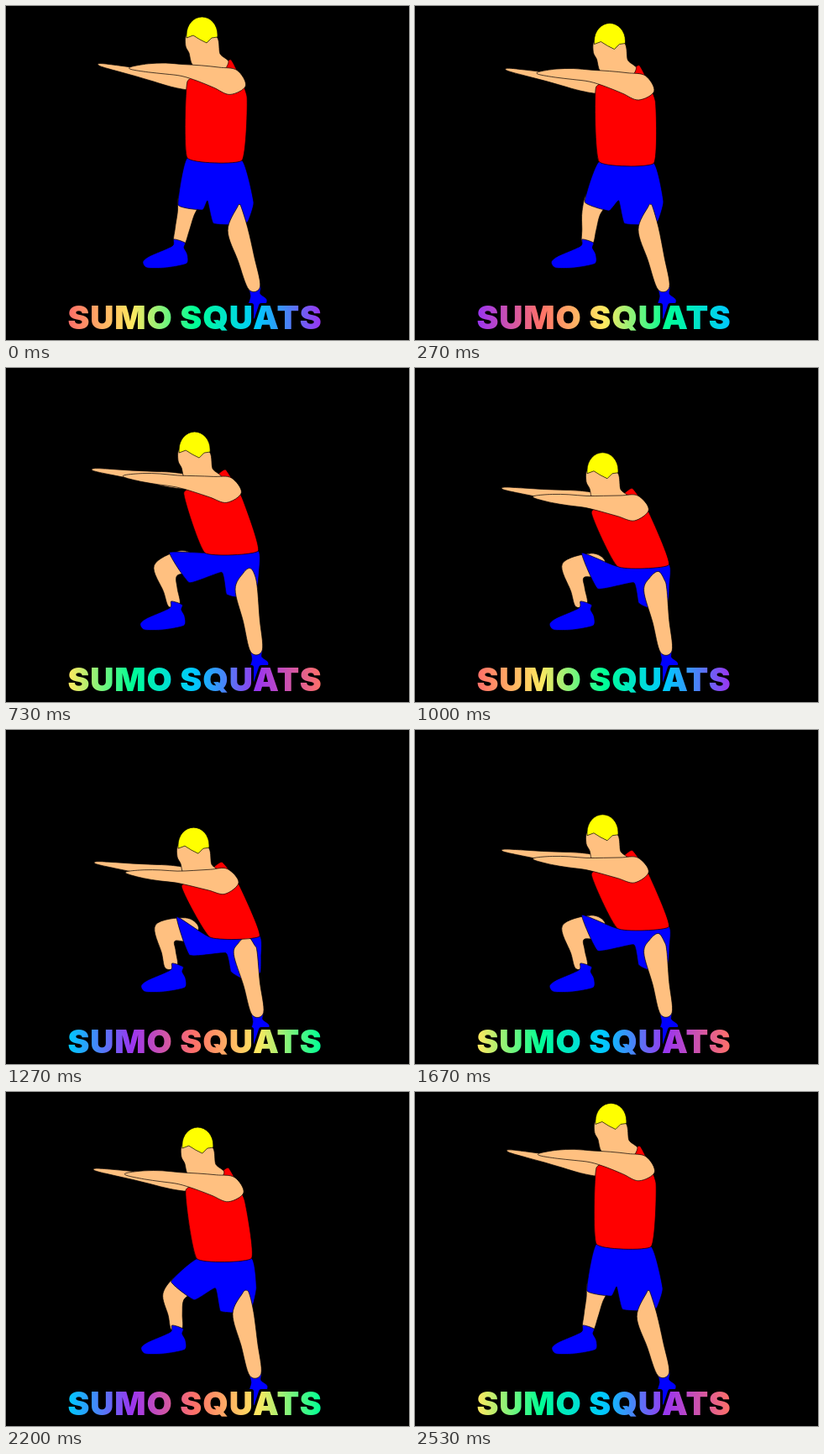
These frames come from a looping animation (480 px wide and 398 px high, 2590 ms). An HTML page with a canvas:

```html
<!DOCTYPE html>
<html lang="en">
<head>
<meta charset="utf-8">
<title>Sumo squats</title>
<style>
  html, body { margin: 0; width: 100%; height: 100%; overflow: hidden; background: #000; }
  canvas { display: block; }
</style>
</head>
<body>
<canvas id="stage" width="480" height="398"></canvas>
<script>
const ctx = document.getElementById('stage').getContext('2d');
const LOOP = 2590, STEP = 200 / 3, COLOUR_STEPS = 15;
const SKIN = '#ffc080', RED = '#ff0000', BLUE = '#0000ff', YELLOW = '#ffff00';
const RAINBOW = ['#ff7068', '#ffe860', '#00ff95', '#00c8ff', '#9b35f0'];

let depth = 0; // 0 standing, 1 deepest squat

const mix = (a, b, t) => a.map((v, i) => v + (b[i] - v) * t);

// A joint moves from its standing to its deep place, bending off the line midway.
const joint = (stand, deep, bend = [0, 0, 0]) =>
  mix(stand, deep, depth).map((v, i) => v + 4 * depth * (1 - depth) * (bend[i] || 0));

// Smooth closed outline; a larger tension keeps corners sharper.
function shape(points, fill, tension = 8) {
  const n = points.length, at = i => points[(i + n) % n];
  ctx.beginPath();
  ctx.moveTo(...at(0).slice(0, 2));
  for (let i = 0; i < n; i++) {
    const [a, b, c, d] = [at(i - 1), at(i), at(i + 1), at(i + 2)];
    ctx.bezierCurveTo(b[0] + (c[0] - a[0]) / tension, b[1] + (c[1] - a[1]) / tension,
      c[0] - (d[0] - b[0]) / tension, c[1] - (d[1] - b[1]) / tension, c[0], c[1]);
  }
  ctx.fillStyle = fill;
  ctx.fill();
  ctx.stroke();
}

// Outline around a spine of [x, y, radius], rounded at its last point.
function limb(spine) {
  const left = [], right = [], last = spine.length - 1;
  spine.forEach(([x, y, r], i) => {
    const a = spine[Math.max(0, i - 1)], b = spine[Math.min(last, i + 1)];
    const angle = Math.atan2(b[1] - a[1], b[0] - a[0]);
    const dx = r * Math.cos(angle), dy = r * Math.sin(angle);
    left.push([x + dy, y - dx]);
    right.unshift([x - dy, y + dx]);
    if (i === last) left.push([x + dx, y + dy]);
  });
  shape([...left, ...right], SKIN, 6);
}

function arm(hand, shoulder, radii, arch) {
  limb(radii.map((r, i) => {
    const t = i / (radii.length - 1), [x, y] = mix(hand, shoulder, t);
    return [x, y - arch * Math.sin(Math.PI * t), r];
  }));
}

function drawLegs(waistLeft, waistRight) {
  const ankle = joint([206, 283, 6], [197, 283, 7]);
  const knee = joint([214, 248, 10], [190, 242, 15], [-10, -3, 2]);
  const hip = joint([219, 228, 13], [216, 238, 14], [-6, -4]);
  limb([ankle, [...mix(ankle, knee, 0.45).slice(0, 2), 8.5], knee, hip]);

  const [bx, by] = joint([0, 0], [-2, 0], [-2, 0]);
  shape([[200, 278], [213, 282], [212, 288], [216, 296], [215, 307], [190, 312],
    [168, 312], [163, 305], [171, 298], [198, 286]].map(([x, y]) => [x + bx, y + by]), BLUE);

  const [fx, fy] = joint([0, 0], [3, 2]);
  shape([[290, 335], [303, 334], [303, 343], [311, 351], [302, 371], [282, 372],
    [288, 356], [291, 346]].map(([x, y]) => [x + fx, y + fy]), BLUE);

  shape([
    waistLeft,
    joint([205, 237], [204, 223], [-10, -9]),
    joint([234, 243], [219, 269], [-7, -3]),
    joint([240, 232], [262, 267], [4, -10]),
    joint([247, 259], [268, 289], [3, -8]),
    joint([276, 261], [281, 297], [-4, -10]),
    joint([288, 257], [303, 291], [1, -12]),
    joint([295, 234], [304, 272], [1, -14]),
    waistRight
  ], BLUE, 16);

  const frontAnkle = joint([296, 336, 7], [300, 338, 7]);
  const frontKnee = joint([276, 266, 12], [285, 266, 14], [5, -3]);
  const thigh = joint([278, 239, 2], [286, 256, 10], [7, -4]);
  limb([frontAnkle, [...mix(frontAnkle, frontKnee, 0.5).slice(0, 2), 10], frontKnee, thigh]);
}

function drawHead() {
  ctx.save();
  ctx.translate(...joint([0, 0], [-10, 105], [-3, 0]));
  shape([[215, 34], [214, 48], [218, 56], [222, 70], [238, 80], [258, 78], [265, 66],
    [255, 57], [252, 38], [234, 20]], SKIN);
  ctx.beginPath();
  ctx.ellipse(233.5, 34, 18.5, 21, 0, Math.PI, 0);
  for (const [x, y] of [[252, 37], [245, 38], [239, 44], [231, 40], [223, 35], [215, 38]]) ctx.lineTo(x, y);
  ctx.closePath();
  ctx.fillStyle = YELLOW;
  ctx.fill();
  ctx.stroke();
  ctx.restore();
}

function drawFigure() {
  const waistLeft = joint([216, 181], [243, 248], [5, -1]);
  const waistRight = joint([281, 184], [302, 247], [7, -4]);
  ctx.strokeStyle = '#000';
  ctx.lineWidth = 0.7;
  arm(joint([112, 70], [108, 160], [-5, -3]), joint([221, 92], [217, 175], [0, -6]),
    [1.5, 3.5, 5, 7, 9, 8], 0);
  drawLegs(waistLeft, waistRight);
  shape([
    joint([216, 90], [209, 188]),
    waistLeft,
    waistRight,
    joint([287, 108], [277, 185]),
    joint([268, 64], [257, 159]),
    joint([250, 78], [241, 170])
  ], RED, 14);
  drawHead();
  arm(joint([149, 74], [145, 172], [-5, -4]), joint([271, 91], [262, 182]),
    [1.5, 5, 6.5, 7, 9.5, 12.5, 15], 6 * (1 - depth));
}

function drawTitle(shift) {
  const rainbow = ctx.createLinearGradient(75, 0, 375, 0), n = RAINBOW.length;
  for (let i = 0; i < n; i++) {
    rainbow.addColorStop(i / (n - 1), RAINBOW[(i + COLOUR_STEPS - shift) % n]);
  }
  ctx.font = '900 39px Inter, sans-serif';
  ctx.letterSpacing = '0.9px';
  ctx.textAlign = 'center';
  ctx.lineJoin = 'round';
  ctx.lineWidth = 6;
  ctx.strokeText('SUMO SQUATS', 225, 385);
  ctx.fillStyle = rainbow;
  ctx.fillText('SUMO SQUATS', 225, 385);
}

function draw(now) {
  const t = now % LOOP;
  const step = Math.floor((t + 3.4) / STEP);
  const swing = Math.PI * Math.min(step, 40 - step) / 20;
  depth = 0.5 - 0.5 * Math.cos(swing) - 0.025 * Math.sin(3 * swing);
  ctx.fillStyle = '#000';
  ctx.fillRect(0, 0, 480, 398);
  drawFigure();
  drawTitle(Math.floor(t / LOOP * COLOUR_STEPS + 0.1) % COLOUR_STEPS);
  requestAnimationFrame(draw);
}
requestAnimationFrame(draw);
</script>
</body>
</html>
```
